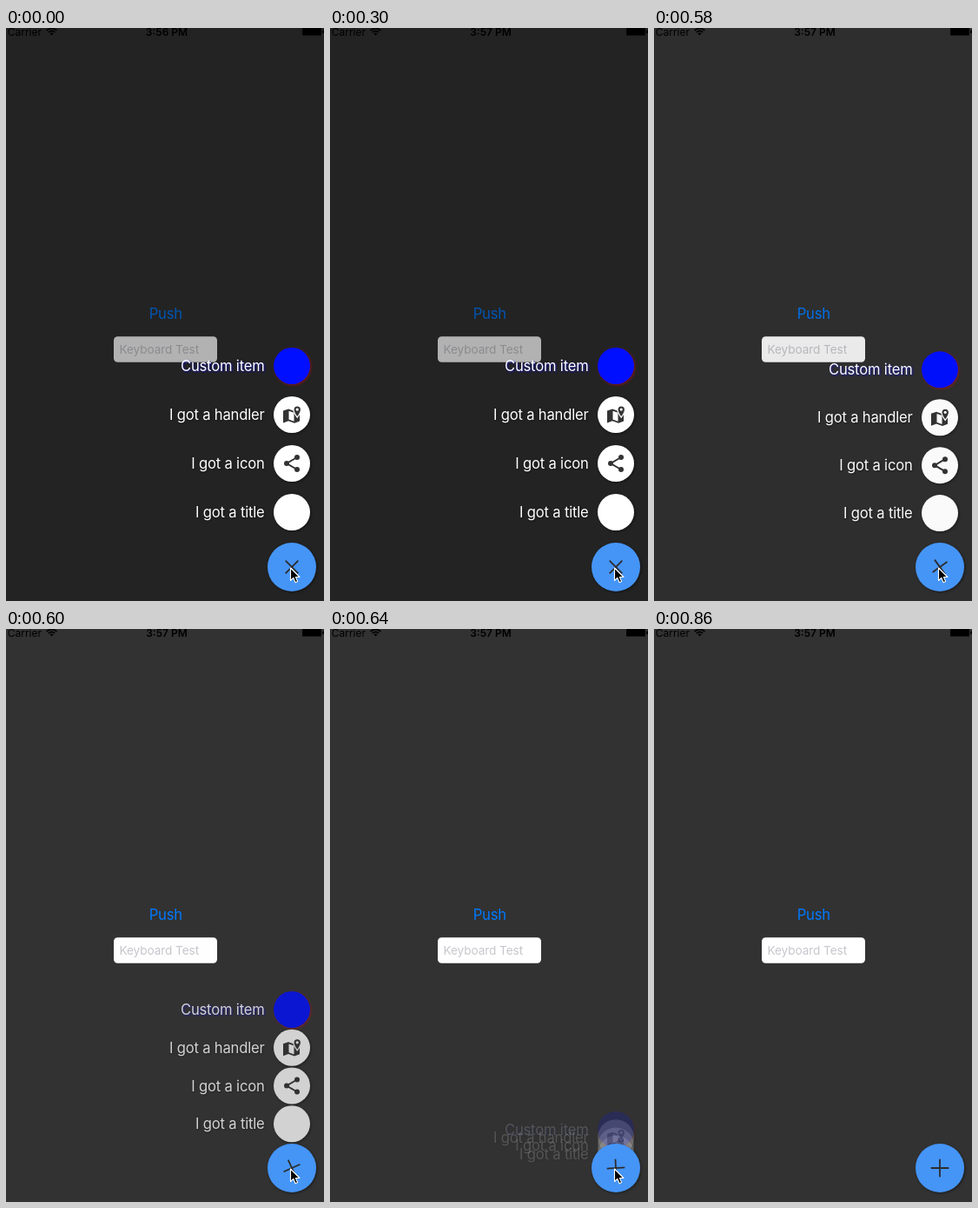
Animation, 366 px wide and 658 px high, one loop 1120 ms. Source, as an HTML page:

```html
<!DOCTYPE html>
<html lang="en">
<head>
<meta charset="utf-8">
<title>Floating action menu</title>
<style>
  html, body { margin: 0; width: 100%; height: 100%; overflow: hidden; background: #323232; }
  svg { display: block; width: 366px; height: 658px; }
  text { font-family: Inter, "Liberation Sans", sans-serif; }
  .label { font-size: 16.6px; letter-spacing: -0.18px; }
  .status { font-size: 12px; }
  .hint { font-size: 13.6px; letter-spacing: -0.07px; }
  .title { fill: #fff; text-anchor: end; filter: drop-shadow(1px 1px 1px var(--glow)); }
  .disc { filter: drop-shadow(1px 1px 1.5px var(--shade)); }
  .item { --glow: rgba(0, 0, 0, .4); --shade: rgba(0, 0, 0, .45); }
  .custom { --glow: rgba(0, 0, 255, .6); --shade: rgba(255, 0, 0, .45); }
</style>
</head>
<body>
<svg viewBox="0 0 366 658">
  <rect width="366" height="658" fill="#323232"/>
  <text class="label" x="164.7" y="333.5" fill="#007aff">Push</text>
  <rect x="124" y="354.3" width="119" height="29.4" rx="4.5" fill="#fff"/>
  <text class="hint" x="130.5" y="374" fill="#c7c7cd">Keyboard Test</text>
  <rect id="shade" width="366" height="658"/>

  <g id="bar">
    <text class="status" x="1.7" y="8.7">Carrier</text>
    <g fill="none" stroke="#000" stroke-width="1.6">
      <path d="M46.6 2.8Q52.5 -2.2 58.4 2.8M48.7 5Q52.5 1.8 56.3 5"/>
      <path d="M50.4 6.3Q52.5 4.6 54.6 6.3L52.5 8.5Z" fill="#000" stroke="none"/>
    </g>
    <text class="status" id="clock" x="185" y="8.7" text-anchor="middle" font-weight="600"></text>
    <rect x="341" y="0" width="22" height="8.5" rx="1"/>
    <rect x="364" y="2.5" width="2" height="3.5" rx=".8"/>
  </g>

  <g id="items"></g>

  <g transform="translate(329 619)">
    <circle class="disc" style="--shade: rgba(0,0,0,.45)" r="28" fill="#4595f7"/>
    <path id="plus" d="M-10.3 0H10.3M0 -10.3V10.3" stroke="#2c2c2c" stroke-width="1.8"/>
    <circle id="tint" r="28" fill="#fff" opacity=".2"/>
  </g>

  <path id="cursor" d="M0 0V14.5L3.3 11.4 5.6 16.7 8.1 15.6 5.9 10.5H10.4Z" stroke="#fff" stroke-width="1.1" stroke-linejoin="round"/>
</svg>
<script>
const LOOP = 1120, TICK = 20, GAP = 56;
const $ = id => document.getElementById(id);

const icons = {
  share: `<path d="M6-7L-6 0 6 7" fill="none" stroke="#333" stroke-width="2"/>
    <g fill="#333"><circle cx="6" cy="-7" r="3"/><circle cx="-6" cy="0" r="3"/><circle cx="6" cy="7" r="3"/></g>`,
  map: `<path d="M-10-4.5L-4-6.5 3-4 9-6V7.5L3 9.8-4 7.3-10 9.5Z" fill="#333"/>
    <path d="M-3.5-4.2V5.6L2.5 7.7V-2.2Z" fill="#fff"/>
    <path d="M6.2 3.2C3.6-.4 1.9-3 1.9-5.8A4.3 4.3 0 0 1 10.5-5.8C10.5-3 8.8-.4 6.2 3.2Z" fill="#333" stroke="#fff" stroke-width="1.2"/>
    <circle cx="6.2" cy="-5.9" r="1.6" fill="#fff"/>`
};

// Listed from the bottom of the menu upwards.
const items = [
  { title: 'I got a title' },
  { title: 'I got a icon', icon: 'share' },
  { title: 'I got a handler', icon: 'map' },
  { title: 'Custom item', color: '#000fff', kind: 'custom' }
];

$('items').innerHTML = items.map(({ title, icon, color = '#fff', kind = '' }) =>
  `<g class="item ${kind}">
    <text class="title label" x="-31.4" y="6">${title}</text>
    <circle class="disc" r="21" fill="${color}"/>${icons[icon] || ''}
  </g>`).join('');
const nodes = [...$('items').children];

const ramp = (t, from, to) => Math.min(1, Math.max(0, (t - from) / (to - from)));
const ease = (t, from, to) => {
  const x = ramp(t, from, to);
  return x * x * (3 - 2 * x);
};
const show = (el, on) => el.setAttribute('visibility', on ? 'visible' : 'hidden');

function draw(time) {
  const t = Math.floor((time % LOOP) / TICK) * TICK;

  $('clock').textContent = t < 300 ? '3:56 PM' : '3:57 PM';
  $('shade').setAttribute('opacity', 0.3 * (1 - ease(t, 530, 606)));
  $('plus').setAttribute('transform', `rotate(${-45 * (1 - ease(t, 548, 658))})`);
  show($('tint'), t >= 520 && t < 560);

  const close = ease(t, 572.5, 663.5);
  nodes.forEach((node, i) => {
    const y = 556 - GAP * i + GAP * (i + 1) * close;
    node.setAttribute('transform', `translate(329 ${y})`);
    node.setAttribute('opacity', 1 - close);
  });

  // The pointer flies upwards before it disappears.
  const leave = ramp(t, 780, 840) ** 2;
  $('cursor').setAttribute('transform', `translate(${327.5 - 20 * leave} ${620 - 475 * leave})`);
  show($('cursor'), t < 860);
}

const start = performance.now();
(function frame() {
  draw(performance.now() - start);
  requestAnimationFrame(frame);
})();
</script>
</body>
</html>
```
